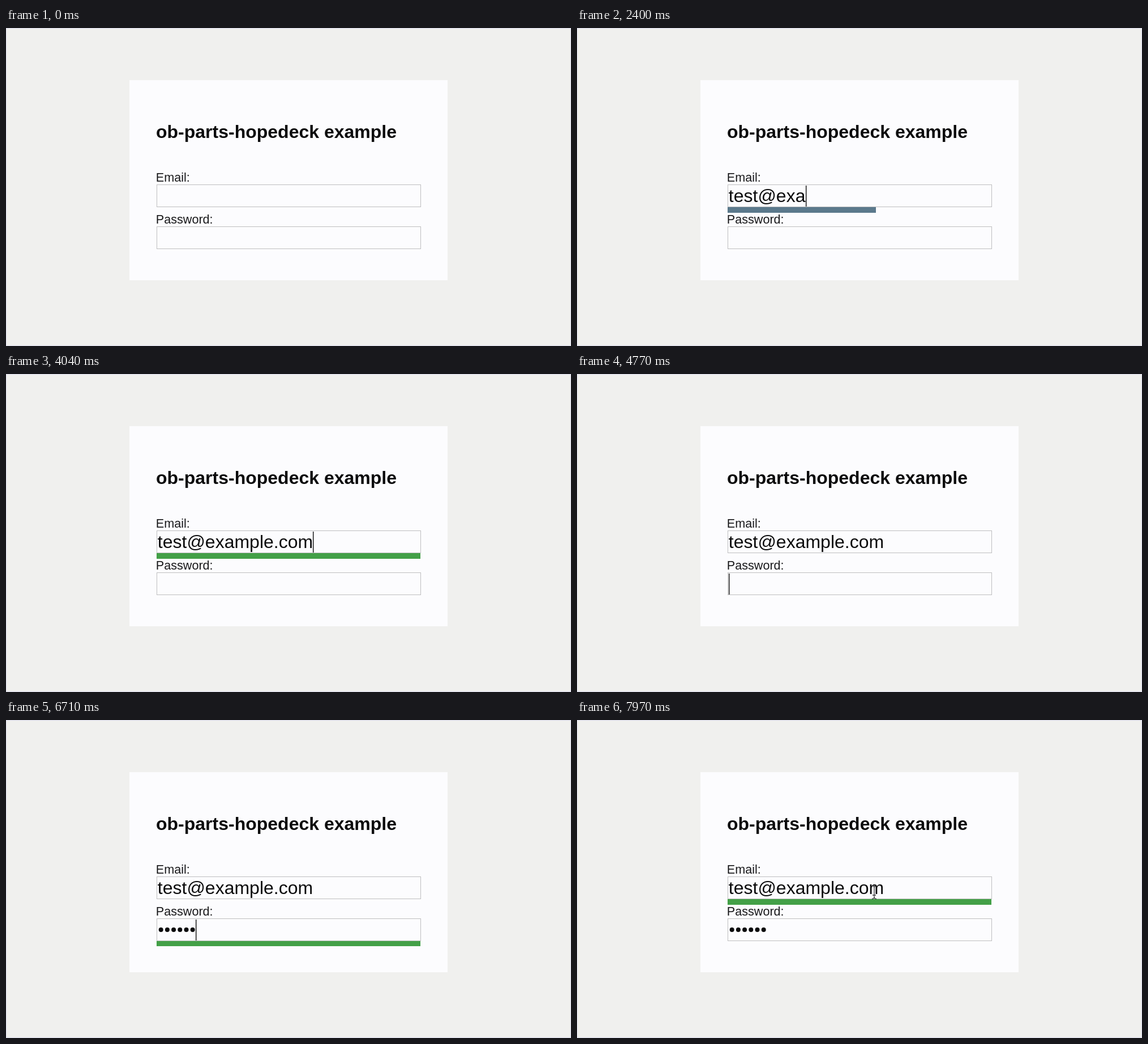
Animation, 998 px wide and 561 px high, one loop 8000 ms. Source, as an HTML page with a canvas:

```html
<!DOCTYPE html>
<html lang="en">
<head>
<meta charset="utf-8">
<title>Form feedback</title>
<style>
  html, body { margin: 0; width: 100%; height: 100%; overflow: hidden; background: #f0f0ee; }
  canvas { display: block; }
</style>
</head>
<body>
<canvas id="stage" width="998" height="561"></canvas>
<script>
const ctx = document.getElementById('stage').getContext('2d');
const LOOP = 8000;
const FONT = '"Liberation Sans", Arial, sans-serif';
const INK = '#0b0b0c';
const RED = [199, 102, 92], BLUE = [91, 121, 140], GREEN = [67, 160, 71];
const CLICK = 7700;

// keys: typing times; bar: [time, width, colour] goals; focus: caret span
const email = {
  label: 'Email:', text: 'test@example.com', top: 277, barTop: 316, barHeight: 10,
  keys: [290, 390, 490, 600, 1350, 1800, 1960, 2120, 2500, 2650, 2800, 2950, 3250, 3430, 3590, 3750],
  bar: [[290, 105, RED], [1800, 262, BLUE], [3590, 466, GREEN], [4500, 0, GREEN], [CLICK, 466, GREEN]],
  focus: [100, 4500]
};
const password = {
  label: 'Password:', dots: true, top: 351, barTop: 390, barHeight: 9,
  keys: [4880, 5240, 5600, 6050, 6230, 6410],
  bar: [[4880, 102, RED], [6050, 262, BLUE], [6410, 466, GREEN], [CLICK, 0, GREEN]],
  focus: [4500, CLICK]
};

const clamp = v => Math.max(0, Math.min(1, v));
const ease = v => v * v * (3 - 2 * v);
const mix = (a, b, k) => a + (b - a) * k;

function write(text, x, y, size, weight = 'normal', color = INK) {
  ctx.font = `${weight} ${size}px ${FONT}`;
  ctx.fillStyle = color;
  ctx.fillText(text, x, y);
}

function drawBar(field, t) {
  let width = 0, color = RED;
  for (const [start, goal, tint] of field.bar) {
    if (t < start) break;
    const k = ease(clamp((t - start) / 220));
    color = color.map((c, i) => Math.round(mix(c, tint[i], k)));
    width = mix(width, goal, k);
  }
  if (width < 0.5) return;
  ctx.fillStyle = `rgb(${color})`;
  ctx.fillRect(266, field.barTop, width, field.barHeight);
}

function drawField(field, t) {
  const { top, keys, focus } = field;
  write(field.label, 264.8, top - 6, 21.6, 'normal', '#19191b');
  ctx.strokeStyle = '#bebebf';
  ctx.lineWidth = 1;
  ctx.strokeRect(266.5, top - 0.5, 466, 39);
  drawBar(field, t);

  const count = keys.filter(k => k <= t).length;
  let end = 268;
  if (field.dots) {
    ctx.fillStyle = INK;
    for (let i = 0; i < count; i++) {
      ctx.beginPath();
      ctx.arc(273.7 + i * 11.2, top + 19, 4, 0, Math.PI * 2);
      ctx.fill();
    }
    end += count * 11.2;
  } else {
    const typed = field.text.slice(0, count);
    write(typed, 267.8, top + 30, 32);
    end += ctx.measureText(typed).width;
  }

  const last = count ? keys[count - 1] : focus[0];
  const active = t >= focus[0] && t < focus[1];
  if (active && (t - last) % 1000 < 500) {
    ctx.fillStyle = INK;
    ctx.fillRect(Math.round(end), top + 1, 1.4, 37);
  }
}

function drawBeam(x, y) {
  ctx.beginPath();
  for (const side of [-4, 4]) {
    ctx.moveTo(x + side, y - 11.5);
    ctx.quadraticCurveTo(x, y - 11.5, x, y - 8);
    ctx.lineTo(x, y + 8);
    ctx.quadraticCurveTo(x, y + 11.5, x + side, y + 11.5);
  }
  ctx.moveTo(x - 3, y + 5);
  ctx.lineTo(x + 3, y + 5);
  ctx.strokeStyle = '#3a3a3c';
  ctx.lineWidth = 1.3;
  ctx.stroke();
}

function drawArrow(x, y) {
  const points = [[0, 0], [0, 22], [5, 17.5], [9, 26], [12.5, 24.5], [8.7, 16], [15.5, 16]];
  ctx.beginPath();
  points.forEach(([dx, dy]) => ctx.lineTo(x + dx, y + dy));
  ctx.closePath();
  ctx.fillStyle = '#000';
  ctx.fill();
  ctx.strokeStyle = '#fff';
  ctx.lineWidth = 1.4;
  ctx.stroke();
}

function drawPointer(t) {
  if (t < 7150) return;
  const k = ease(clamp((t - 7150) / 530));
  const x = mix(782, 525, k), y = mix(575, 304, k);
  const inside = x > 266 && x < 733 && [email, password].some(f => y > f.top && y < f.top + 39);
  (inside ? drawBeam : drawArrow)(x, y);
}

function draw(t) {
  ctx.fillStyle = '#f0f0ee';
  ctx.fillRect(0, 0, 998, 561);
  ctx.strokeStyle = '#dcdcec';
  ctx.lineWidth = 1;
  ctx.strokeRect(0.5, 0.5, 997, 560);
  ctx.fillStyle = '#fcfcfe';
  ctx.fillRect(218, 92, 562, 353);
  write('ob-parts-hopedeck example', 265, 194, 32, 'bold');
  drawField(email, t);
  drawField(password, t);
  drawPointer(t);
}

const begin = performance.now();
function tick() {
  draw((performance.now() - begin) % LOOP);
  requestAnimationFrame(tick);
}
tick();
</script>
</body>
</html>
```
